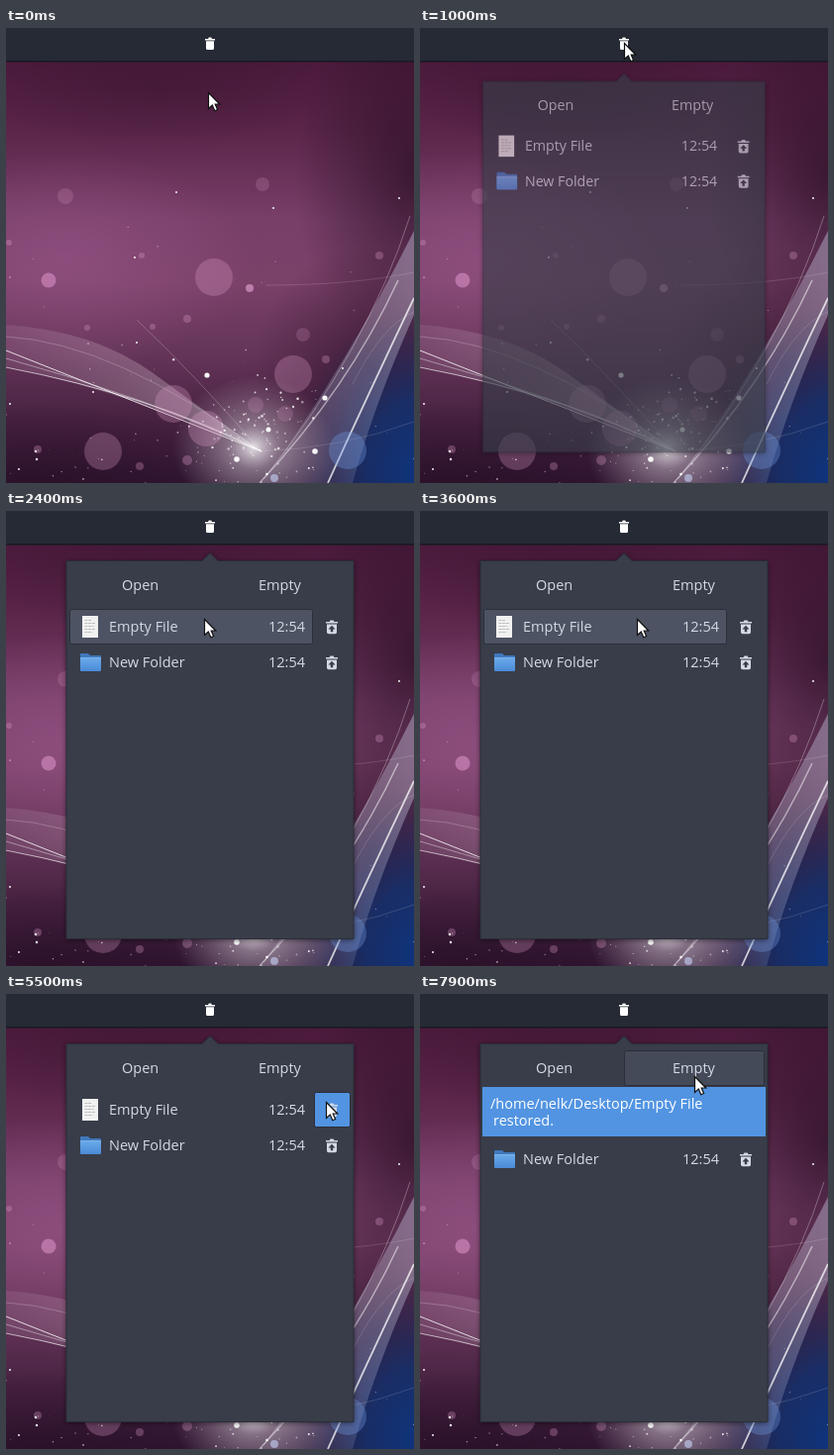
Animation, 412 px wide and 460 px high, one loop 8 s. Source, as an HTML page:

```html
<!DOCTYPE html>
<html lang="en">
<head>
<meta charset="utf-8">
<title>Trash applet</title>
<style>
  html, body { margin: 0; width: 100%; height: 100%; overflow: hidden; background: #4b1a3c; }
  svg { display: block; width: 100%; height: 100%; }
  text { font: 14.5px "Open Sans", "Noto Sans", sans-serif; fill: #d3dae3; }
  #notice text { fill: #fff; }
  .hover { stroke: #2b2e39; visibility: hidden; }
</style>
</head>
<body>
<svg viewBox="0 0 412 460">
  <defs>
    <linearGradient id="sky" x2="0" y2="1">
      <stop offset=".07" stop-color="#4c1a3c"/>
      <stop offset=".22" stop-color="#5a2549"/>
      <stop offset=".42" stop-color="#783f69"/>
      <stop offset=".56" stop-color="#7a4169"/>
      <stop offset=".72" stop-color="#643458"/>
      <stop offset=".86" stop-color="#472241"/>
      <stop offset="1" stop-color="#2f1531"/>
    </linearGradient>
    <radialGradient id="pink"><stop stop-color="#a05a90" stop-opacity=".5"/><stop offset="1" stop-color="#a05a90" stop-opacity="0"/></radialGradient>
    <radialGradient id="dark"><stop stop-color="#270d22" stop-opacity=".7"/><stop offset="1" stop-color="#270d22" stop-opacity="0"/></radialGradient>
    <radialGradient id="blue"><stop stop-color="#0d3580"/><stop offset=".45" stop-color="#14306c" stop-opacity=".85"/><stop offset="1" stop-color="#1b2350" stop-opacity="0"/></radialGradient>
    <radialGradient id="glow"><stop stop-color="#fff" stop-opacity=".85"/><stop offset=".3" stop-color="#e4dce6" stop-opacity=".45"/><stop offset="1" stop-color="#c8b8c8" stop-opacity="0"/></radialGradient>
    <linearGradient id="fan" x2="1"><stop stop-color="#e0b8d4" stop-opacity=".12"/><stop offset="1" stop-color="#fff" stop-opacity=".35"/></linearGradient>
    <linearGradient id="ray" x1="1" x2="0" y2="1"><stop stop-color="#cfd4ee" stop-opacity=".4"/><stop offset="1" stop-color="#cfd4ee" stop-opacity=".1"/></linearGradient>
    <linearGradient id="folderFace" x2="0" y2="1"><stop stop-color="#6aaaea"/><stop offset="1" stop-color="#4a8ad6"/></linearGradient>
    <filter id="shadow" x="-10%" y="-10%" width="120%" height="120%"><feDropShadow dx="0" dy="1" stdDeviation="2.5" flood-opacity=".5"/></filter>
    <clipPath id="noticeClip"><rect x="63" y="94" width="286" height="60"/></clipPath>
    <g id="restore">
      <path d="M323 112h3.5l1-1.500h3l1 1.500h3.500v1.600h-12zM324 114.500h10v8q0 1.700-1.700 1.700h-6.600q-1.700 0-1.700-1.700z" fill="#d3dae3"/>
      <path d="M329 115.800l3.500 3.600h-2.300v2.800h-2.400v-2.800h-2.300z" fill="#383c4a"/>
    </g>
  </defs>

  <g id="wallpaper">
    <rect width="412" height="460" fill="url(#sky)"/>
    <ellipse cx="60" cy="235" rx="190" ry="110" fill="url(#pink)"/>
    <ellipse cx="150" cy="60" rx="190" ry="65" fill="url(#dark)" opacity=".4"/>
    <ellipse cx="412" cy="150" rx="120" ry="190" fill="url(#dark)"/>
    <ellipse cx="370" cy="340" rx="120" ry="120" fill="url(#dark)" opacity=".8"/>
    <ellipse cx="40" cy="460" rx="190" ry="80" fill="url(#dark)" opacity=".7"/>
    <ellipse cx="420" cy="450" rx="130" ry="170" fill="url(#blue)"/>
    <path d="M0 300Q90 306 150 350T258 428Q130 370 0 342z" fill="url(#fan)"/>
    <path d="M412 272Q365 372 325 460H258Q345 340 412 205z" fill="url(#ray)"/>
    <path d="M412 290Q372 380 350 460H325Q365 372 412 272z" fill="url(#ray)"/>
    <g fill="none" stroke="#fff">
      <path d="M0 326Q130 378 258 428" stroke-opacity=".8"/>
      <path d="M0 343Q150 372 258 428" stroke-opacity=".65"/>
      <path d="M0 334Q140 372 258 428" stroke-opacity=".4"/>
      <path d="M0 312Q110 318 258 428M132 295Q190 350 258 428" stroke-opacity=".22"/>
      <path d="M412 273Q365 372 325 460" stroke-opacity=".75" stroke-width="1.800"/>
      <path d="M408 190Q365 325 260 456" stroke-opacity=".3"/>
      <path d="M396 255Q345 365 256 460" stroke-opacity=".5" stroke-width="1.500"/>
      <path d="M262 260Q350 260 412 247M255 428Q340 425 412 398M350 360Q380 300 412 287" stroke-opacity=".14"/>
    </g>
    <ellipse cx="250" cy="424" rx="82" ry="72" fill="url(#glow)"/>
  </g>

  <g id="panel">
    <rect width="412" height="33" fill="#252a35"/>
    <rect y="33" width="412" height="1.500" fill="#171a21"/>
    <path d="M201 11h3l.8-1.500h2.400l.8 1.500h3v1.500h-10zM202 13.300h8v7.200q0 1.500-1.500 1.500h-5q-1.500 0-1.500-1.500z" fill="#fff"/>
  </g>

  <g id="popup">
    <path d="M61 50.500H198L206 42.500 214 50.500H351V432.500H61z" fill="#383c4a" stroke="#2b2e39" filter="url(#shadow)"/>
    <rect id="openHover" class="hover" x="65.500" y="57.500" width="140" height="35" rx="2" fill="#444a58"/>
    <rect id="emptyHover" class="hover" x="206.500" y="57.500" width="141" height="35" rx="2" fill="#444a58"/>
    <text x="117" y="80">Open</text>
    <text x="255" y="80">Empty</text>
    <g id="fileRow">
      <rect id="rowHover" class="hover" x="64.500" y="99.500" width="245" height="35" rx="2" fill="#4d5363"/>
      <rect id="restoreHover" class="hover" x="311.500" y="99.500" width="36" height="35" rx="2" fill="#444a58"/>
      <path d="M77 106h16v22h-16z" fill="#f1f1f1"/>
      <path d="M79.500 110.500h7M79.500 113.500h11M79.500 116.500h9M79.500 119.500h11M79.500 122.500h8" stroke="#bdbdbd" stroke-dasharray="3 .7"/>
      <text x="104" y="122">Empty File</text>
      <text x="265" y="122">12:54</text>
      <use href="#restore"/>
    </g>
    <g id="folderRow">
      <path d="M75 109q0-1 1-1h7l2 2h10q1 0 1 1v14h-21z" fill="#3f78bd"/>
      <rect x="75" y="112.500" width="21" height="13.500" rx="1" fill="url(#folderFace)"/>
      <path d="M75 112.500h21" stroke="#8fc1f2" stroke-width=".7"/>
      <text x="104" y="122">New Folder</text>
      <text x="265" y="122">12:54</text>
      <use href="#restore"/>
    </g>
    <g clip-path="url(#noticeClip)">
      <g id="notice">
        <rect x="63" y="94" width="286" height="50" fill="#5294e2"/>
        <text x="71" y="116">/home/nelk/Desktop/Empty File</text>
        <text x="74" y="133">restored.</text>
      </g>
    </g>
  </g>

  <path id="cursor" d="M.5 .5V16.500L4.300 13 6.800 18.800 9.600 17.500 7.200 12H11.800z" fill="#fff" stroke="#111" stroke-width="1.200"/>
</svg>

<script>
const LOOP = 8000, STEP = 100;
const $ = id => document.getElementById(id);

// Wallpaper bubbles: x, y, radius
const softBubbles = [
  [210, 252, 19], [290, 350, 19], [169, 380, 19], [202, 405, 18], [98, 428, 19],
  [60, 170, 8], [259, 158, 7], [300, 310, 7], [282, 390, 8], [183, 294, 4],
  [377, 230, 4], [323, 335, 4], [148, 302, 3], [82, 303, 3], [137, 230, 3],
  [3, 217, 3], [32, 426, 4], [135, 443, 4], [183, 437, 5], [252, 381, 8]
];
const brightDots = [
  [203, 351, 2.6], [322, 374, 2.6], [312, 428, 2.8], [233, 436, 2.8], [265, 406, 2.5],
  [172, 166, 1], [270, 182, 1], [130, 232, 1], [397, 172, 1], [88, 368, 1],
  [30, 428, 1.2], [31, 436, 1.2], [13, 446, 1], [4, 380, 1], [132, 318, 1], [340, 344, 1]
];

function dot(x, y, r, fill, opacity) {
  const c = document.createElementNS("http://www.w3.org/2000/svg", "circle");
  Object.entries({ cx: x, cy: y, r, fill, opacity }).forEach(([k, v]) => c.setAttribute(k, v));
  $("wallpaper").append(c);
}

let seed = 11;
const random = () => (seed = (seed * 16807) % 2147483647) / 2147483647;
const spread = () => random() + random() + random() - 1.5;

softBubbles.forEach(([x, y, r]) => dot(x, y, r, "#e0a0cc", r > 15 ? .28 : r > 6 ? .2 : .3));
dot(43, 255, 7.5, "#d890c4", .6);
dot(246, 263, 4, "#e0a0d0", .65);
dot(345, 427, 19, "#6f98e0", .35);
dot(271, 455, 4, "#c8d4f8", .6);
brightDots.forEach(([x, y, r]) => dot(x, y, r, "#fff", .95));
for (let i = 0; i < 110; i++)
  dot(247 + spread() * 65, 408 + spread() * 55, .4 + random() * .9, "#fff", .35 + random() * .6);
for (let i = 0; i < 50; i++)
  dot(random() * 412, 460 - 260 * random() ** 1.6, .4 + random() * .5, "#f4d8ec", .3 + random() * .5);

// Each track: [time, ...values], linear in between
const cursorTrack = [
  [200, 204, 65], [700, 206, 16], [1100, 206, 15], [1700, 201, 77], [2400, 200, 109],
  [3500, 200, 109], [4100, 316, 109], [4400, 321, 109], [4500, 323, 109],
  [7300, 323, 109], [7900, 277, 83]
];
const popupTrack = [[800, 0, .96], [900, .2, .965], [1000, .65, .981], [1100, .92, .995], [1200, 1, 1]];
const noticeTrack = [[5500, 0], [5600, 20], [5700, 38], [5800, 47], [5900, 50]];

function sample(track, t) {
  const next = track.findIndex(k => k[0] > t);
  if (next < 0) return track.at(-1).slice(1);
  if (next === 0) return track[0].slice(1);
  const a = track[next - 1], b = track[next], p = (t - a[0]) / (b[0] - a[0]);
  return a.slice(1).map((v, i) => v + (b[i + 1] - v) * p);
}

const show = (id, on) => $(id).style.visibility = on ? "visible" : "hidden";
const move = (id, x, y) => $(id).setAttribute("transform", `translate(${x} ${y})`);

function render(t) {
  const [x, y] = sample(cursorTrack, t).map(Math.round);
  const [opacity, scale] = sample(popupTrack, t);
  const [reveal] = sample(noticeTrack, t);
  const restored = t >= 5600;
  const inHeader = opacity === 1 && y >= 58 && y < 93;
  const inRow = !restored && y >= 99 && y < 135;

  move("cursor", x, y);
  $("popup").setAttribute("opacity", opacity);
  $("popup").setAttribute("transform", `translate(206 241) scale(${scale}) translate(-206 -241)`);

  show("openHover", inHeader && x < 206);
  show("emptyHover", inHeader && x >= 207);
  show("rowHover", inRow && x < 310);
  show("restoreHover", inRow && x > 316);
  $("restoreHover").setAttribute("fill", t >= 5500 ? "#5294e2" : "#444a58");

  $("fileRow").style.display = restored ? "none" : "";
  move("folderRow", 0, restored ? reveal : 36);
  move("notice", 0, reveal - 50);
  show("notice", restored);
}

const start = performance.now();
function tick() {
  const t = (performance.now() - start) % LOOP;
  render(Math.floor(t / STEP) * STEP);
  requestAnimationFrame(tick);
}
tick();
</script>
</body>
</html>
```
